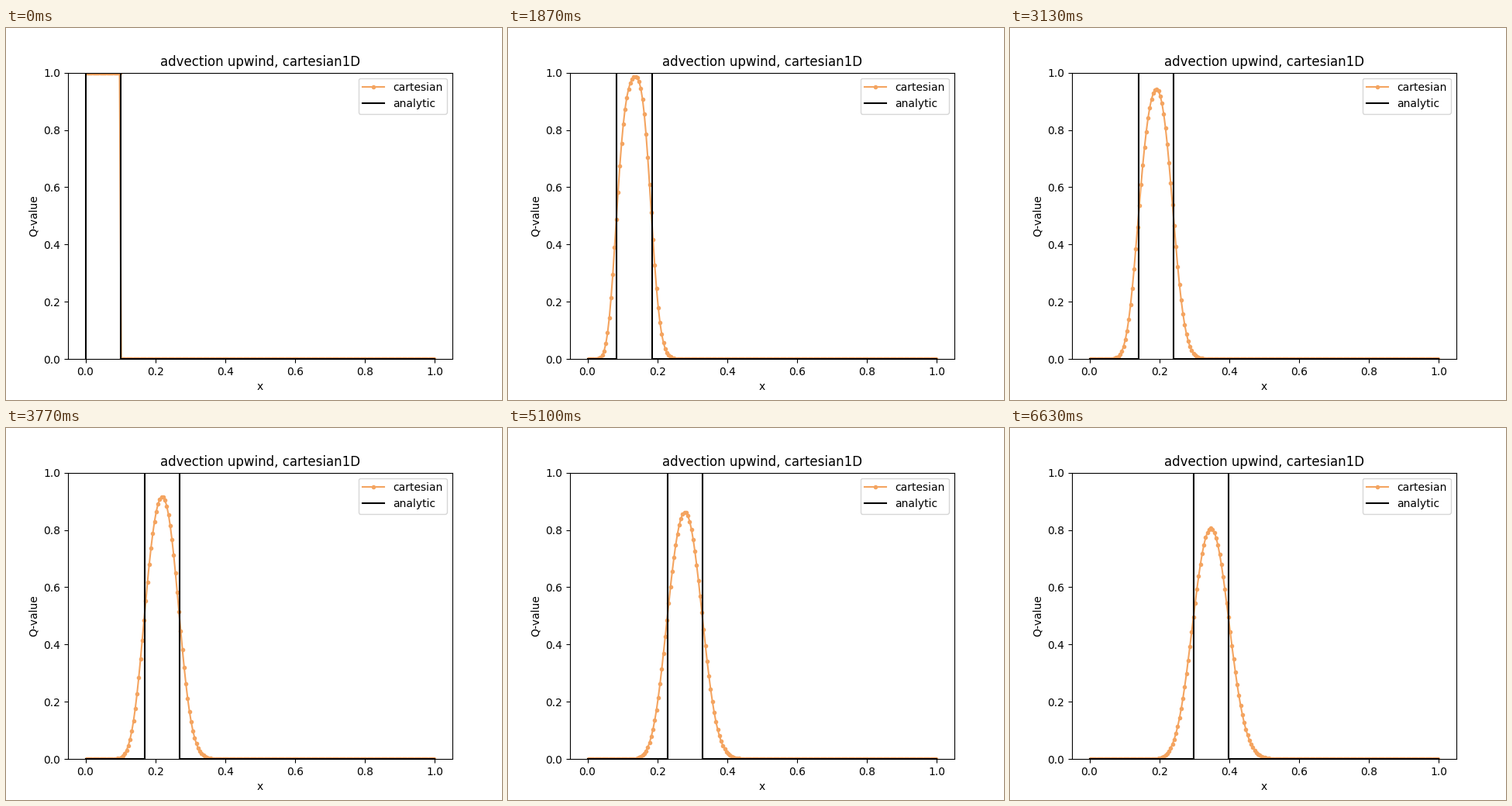
A matplotlib script for the animation above (6660 ms loop, 640 by 480 pixels).

```python
import numpy as np
import matplotlib.pyplot as plt
from matplotlib.animation import FuncAnimation

LOOP_MS = 6660
FRAMES = 200
CELLS = 200
WIDTH = 0.1       # width of the initial pulse
SHIFT = 0.0015    # distance travelled per frame
CFL = 0.005

dx = 1 / CELLS
centers = (np.arange(CELLS) + 0.5) * dx
substeps = round(SHIFT / (CFL * dx))


def upwind(q):
    """Advance one frame with first-order upwind and an empty inflow."""
    q = q.copy()
    for _ in range(substeps):
        q -= CFL * np.diff(q, prepend=0.0)
    return q


states = [np.where(centers < WIDTH, 1.0, 0.0)]
while len(states) < FRAMES:
    states.append(upwind(states[-1]))

fig, ax = plt.subplots(figsize=(6.4, 4.8), dpi=100)
numeric, = ax.plot([], [], marker=".", color="sandybrown", label="cartesian")
exact, = ax.plot([], [], color="black", label="analytic")
ax.set(xlim=(-0.05, 1.05), ylim=(0, 1), xlabel="x", ylabel="Q-value",
       title="advection upwind, cartesian1D")
ax.legend(loc="upper right")


def update(i):
    left = i * SHIFT
    right = left + WIDTH
    numeric.set_data(centers, states[i])
    exact.set_data([0, left, left, right, right, 1], [0, 0, 1, 1, 0, 0])
    return numeric, exact


anim = FuncAnimation(fig, update, frames=FRAMES, interval=LOOP_MS / FRAMES,
                     repeat=True, repeat_delay=0, blit=False)
plt.show()
```
